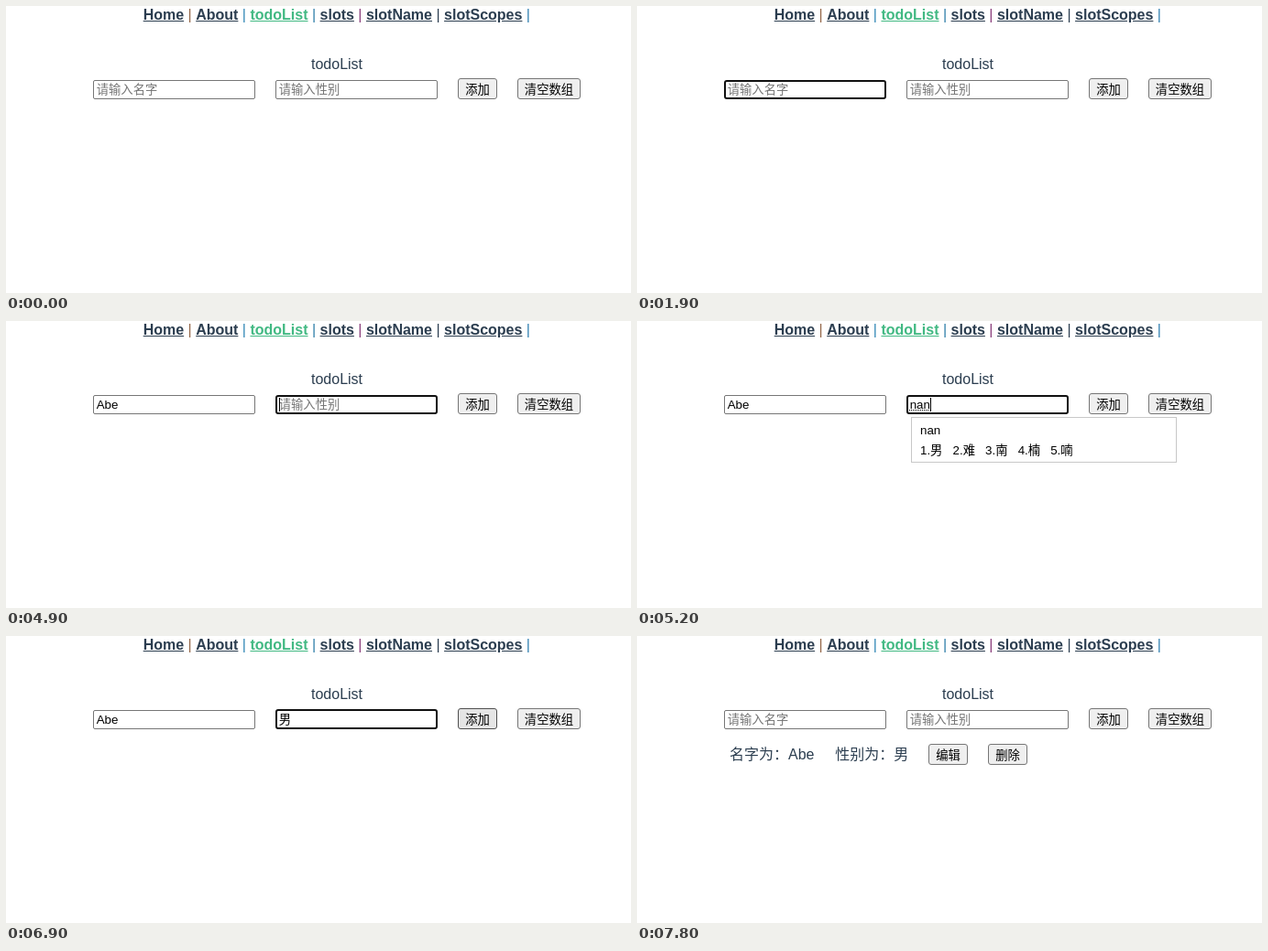
An HTML page that plays this animation: 682 px wide and 314 px high, repeating every 8 s.

```html
<!DOCTYPE html>
<html lang="zh-CN">
<head>
<meta charset="utf-8">
<title>todoList</title>
<style>
  html, body { margin: 0; width: 100%; height: 100%; overflow: hidden; background: #fff; }
  #stage {
    position: relative; width: 682px; height: 314px; overflow: hidden;
    color: #2c3e50; font: 16px/17px "Liberation Sans", "Noto Sans CJK SC", "Noto Sans CJK", sans-serif;
  }
  #stage div { position: absolute; box-sizing: border-box; white-space: pre; }
  b { text-decoration: underline; }
  b.active { color: #42b983; }
  #stage .field, #stage .button, #stage .popup { font-size: 13.333px; line-height: 15px; color: #000; }
  .field { width: 177px; border: 1px solid #767676; border-radius: 2px; background: #fff; }
  .field.hover { border-color: #4f4f4f; }
  .field.focus { border: 2px solid #101010; border-radius: 3px; }
  .text.empty { color: #757575; }
  .text.composing { text-decoration: underline dotted 1px; }
  .caret { width: 1px; height: 15px; top: 84px; background: #000; }
  .button {
    height: 23px; padding-top: 4px; text-align: center;
    background: #efefef; border: 1px solid #767676; border-radius: 3px;
  }
  .button.hover { background: #e5e5e5; border-color: #4f4f4f; }
  .button.press { background: #f5f5f5; border-color: #8d8d8d; }
  .popup { left: 299px; top: 105px; width: 290px; height: 50px; background: #fff; border: 1px solid #c8c8c8; }
  .popup div { left: 9px; }
</style>
</head>
<body>
<div id="stage"></div>
<script>
const LOOP = 8000;
const NAME = 'Abe';
const stage = document.getElementById('stage');

function add(cls, x, y, text = '', parent = stage) {
  const el = document.createElement('div');
  el.className = cls;
  el.style.left = x + 'px';
  el.style.top = y + 'px';
  el.textContent = text;
  parent.append(el);
  return el;
}

function addButton(x, y, width, label) {
  const el = add('button', x, y, label);
  el.style.width = width + 'px';
  return el;
}

function addField(x, hint) {
  return { box: add('field', x, 81), text: add('text button-text', x + 3.7, 84), hint };
}

const nav = add('nav', 149.7, 1);
const links = [
  ['Home', '#96684a'], ['About', '#2f86b5'], ['todoList', '#2f7fa8'],
  ['slots', '#8a3f7c'], ['slotName', '#2c3e50'], ['slotScopes', '#2f7fb0']
];
for (const [label, barColor] of links) {
  const link = document.createElement('b');
  const bar = document.createElement('span');
  link.textContent = label;
  if (label === 'todoList') link.className = 'active';
  bar.textContent = ' | ';
  bar.style.color = barColor;
  nav.append(link, bar);
}

add('', 333, 55, 'todoList');
const fields = [addField(95, '请输入名字'), addField(294, '请输入性别')];
for (const { text } of fields) {
  text.style.font = '13.333px/15px "Liberation Sans", "Noto Sans CJK SC", "Noto Sans CJK", sans-serif';
}
const caret = add('caret', 99, 84);
const addBtn = addButton(493, 79, 43, '添加');
addButton(558, 79, 69, '清空数组');

const row = [
  add('', 101, 121, '名字为：' + NAME),
  add('', 216.3, 121, '性别为：男'),
  addButton(318, 118, 43, '编辑'),
  addButton(383, 118, 43, '删除')
];
const removeBtn = row[3];

const popup = add('popup', 299, 105);
const pinyin = add('', 9, 6, '', popup);
const candidates = add('', 9, 28, '', popup);
const choices = {
  n: '1.你   2.年   3.那   4.能   5.呢',
  na: '1.那   2.拿   3.哪   4.呐   5.娜',
  nan: '1.男   2.难   3.南   4.楠   5.喃'
};

// Each step changes part of the state from its time on.
const initial = {
  name: '', sex: '', compose: '', focus: -1, hover: -1,
  caret: 0, addState: '', removeState: '', listed: false
};
const steps = [
  [1100, { hover: 0 }],
  [1500, { focus: 0, caret: 99 }],
  [1900, { caret: 0 }],
  [2400, { caret: 99 }],
  [2600, { name: NAME.slice(0, 1), caret: 107 }],
  [2900, { name: NAME.slice(0, 2), caret: 115 }],
  [3000, { name: NAME, caret: 123 }],
  [3500, { caret: 0 }],
  [3900, { focus: 1, hover: 1, caret: 298 }],
  [4400, { caret: 0 }],
  [4900, { caret: 298 }],
  [5000, { compose: 'n', caret: 305 }],
  [5100, { compose: 'na', caret: 312 }],
  [5200, { compose: 'nan', caret: 320 }],
  [5400, { compose: '', sex: '男', caret: 311 }],
  [6000, { caret: 0 }],
  [6300, { hover: 0 }],
  [6400, { hover: -1, caret: 311 }],
  [6700, { addState: 'hover' }],
  [6900, { caret: 0 }],
  [7200, { focus: -1, addState: 'press' }],
  [7300, { name: '', sex: '', listed: true, addState: 'hover' }],
  [7700, { addState: '', removeState: 'hover' }],
  [7800, { removeState: '' }]
];

const show = (el, visible) => { el.style.visibility = visible ? 'visible' : 'hidden'; };

function render(count) {
  const s = Object.assign({}, initial, ...steps.slice(0, count).map(step => step[1]));
  [s.name, s.compose || s.sex].forEach((value, i) => {
    const { box, text, hint } = fields[i];
    const top = i === 1 && s.sex ? 80 : 81;
    box.className = 'field' + (s.hover === i ? ' hover' : '') + (s.focus === i ? ' focus' : '');
    box.style.top = top + 'px';
    box.style.height = 102 - top + 'px';
    text.textContent = value || hint;
    text.className = 'text' + (value ? '' : ' empty') + (i === 1 && s.compose ? ' composing' : '');
    text.style.color = value ? '#000' : '#757575';
  });
  caret.style.left = s.caret + 'px';
  show(caret, s.caret > 0);
  addBtn.className = 'button ' + s.addState;
  removeBtn.className = 'button ' + s.removeState;
  row.forEach(el => show(el, s.listed));
  pinyin.textContent = s.compose;
  candidates.textContent = choices[s.compose] || '';
  show(popup, s.compose !== '');
}

let shown = -1;
const start = performance.now();
function tick() {
  const t = (performance.now() - start) % LOOP;
  const count = steps.filter(([at]) => at <= t).length;
  if (count !== shown) render(shown = count);
  requestAnimationFrame(tick);
}
tick();
</script>
</body>
</html>
```
